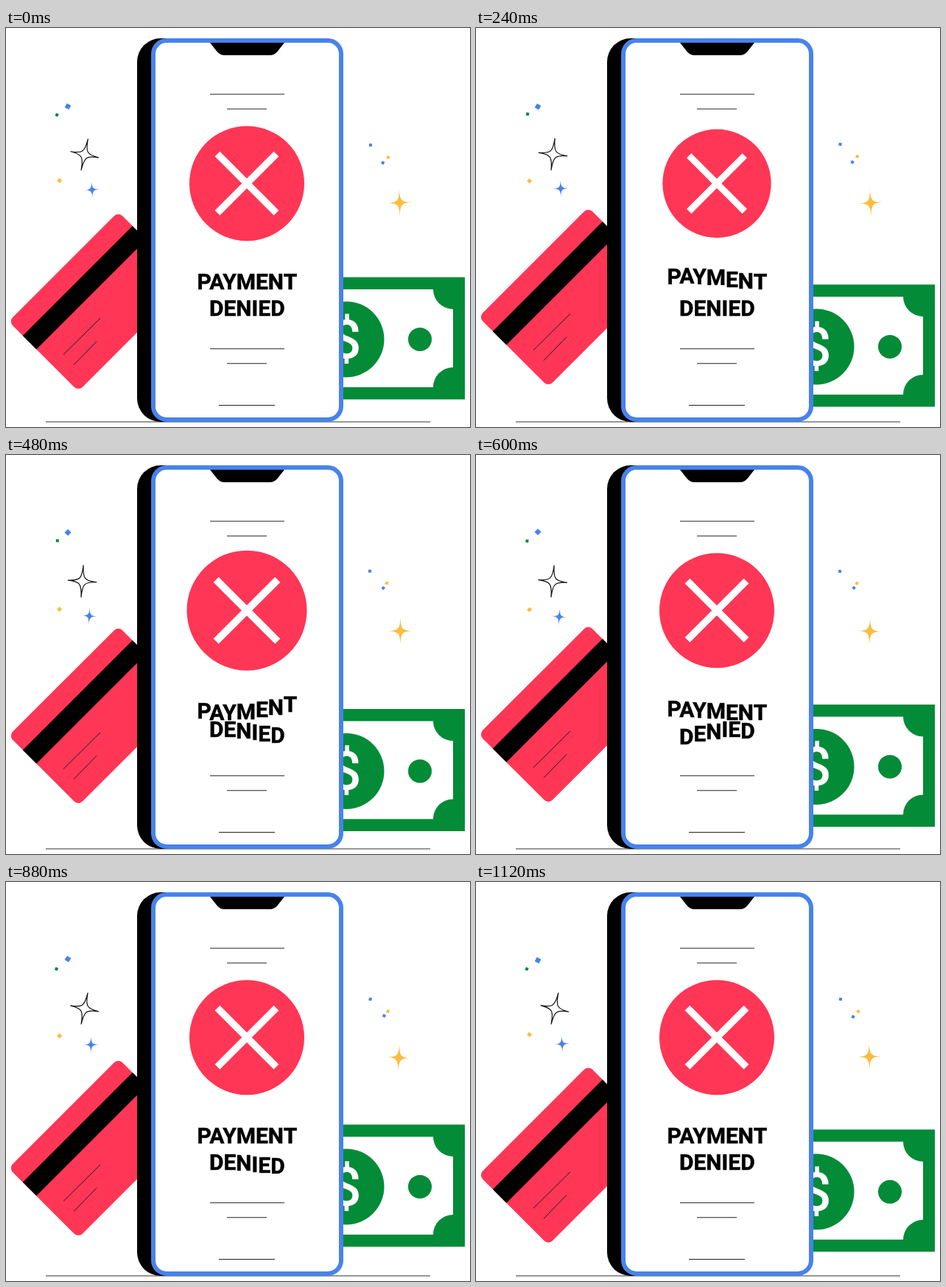
An HTML page with a canvas for the animation above (1160 ms loop, 630 by 542 pixels).

```html
<!DOCTYPE html>
<html lang="en">
<head>
<meta charset="utf-8">
<title>Payment denied</title>
<style>
  html, body { margin: 0; width: 630px; height: 542px; overflow: hidden; background: #fff; }
  canvas { display: block; }
</style>
</head>
<body>
<canvas id="stage" width="630" height="542"></canvas>
<script>
const ctx = document.getElementById('stage').getContext('2d');
const LOOP = 1160, STEP = 40;
const RED = '#ff3655', GREEN = '#048b37', BLUE = '#4783eb', YELLOW = '#fcbc42';

// Periodic swing that peaks at the given time in ms.
const swing = (t, peak) => Math.cos((t - peak) / LOOP * 2 * Math.PI);
const smooth = p => p * p * (3 - 2 * p);

// Eased keys, 200 ms apart; holds the first and last value.
function keyed(t, keys) {
  const last = keys.length - 1;
  const p = Math.min(Math.max(t / 200, 0), last);
  const i = Math.min(Math.floor(p), last - 1);
  return keys[i] + (keys[i + 1] - keys[i]) * smooth(p - i);
}

function at(x, y, deg, draw) {
  ctx.save();
  ctx.translate(x, y);
  ctx.rotate(deg * Math.PI / 180);
  draw();
  ctx.restore();
}

function line(x1, y1, x2, y2, width = 1, color = '#222') {
  ctx.beginPath();
  ctx.moveTo(x1, y1);
  ctx.lineTo(x2, y2);
  ctx.lineWidth = width;
  ctx.strokeStyle = color;
  ctx.stroke();
}

function disc(x, y, r, color) {
  ctx.beginPath();
  ctx.arc(x, y, r, 0, 2 * Math.PI);
  ctx.fillStyle = color;
  ctx.fill();
}

function box(x, y, w, h, color, r = 0) {
  ctx.beginPath();
  ctx.roundRect(x, y, w, h, r);
  ctx.fillStyle = color;
  ctx.fill();
}

function square(x, y, size, deg, color) {
  at(x, y, deg, () => box(-size / 2, -size / 2, size, size, color));
}

// Four thin points around a small body.
function starPath(rx, ry) {
  const near = 0.03, far = 0.16;
  ctx.beginPath();
  ctx.moveTo(0, -ry);
  for (const [sx, sy, vertical] of [[1, -1, true], [1, 1, false], [-1, 1, true], [-1, -1, false]]) {
    const x = sx * rx, y = sy * ry;
    if (vertical) ctx.bezierCurveTo(x * near, y * far, x * far, y * near, x, 0);
    else ctx.bezierCurveTo(x * far, y * near, x * near, y * far, 0, y);
  }
  ctx.closePath();
}

function star(x, y, rx, ry, deg, color) {
  at(x, y, deg, () => {
    starPath(rx, ry);
    ctx.fillStyle = color;
    ctx.fill();
  });
}

function sparkles(t) {
  const s = peak => swing(t, peak);
  square(84, 105.6 + 1.4 * s(150), 6.4, 35 + 8 * s(560), BLUE);
  square(69.3 + 0.8 * s(330), 117.4 - s(430), 4, 15 - 10 * s(430), GREEN);
  square(72.6, 208.6 - 1.5 * s(60), 5, 42 + 6 * s(600), YELLOW);
  star(114.9 + 1.9 * s(1120), 219.5 - 1.5 * s(300), 10.5, 12, -5 * s(0), BLUE);

  // The outlined star rocks on its lower tip.
  at(102, 193.2, 8.7 - 4.8 * s(450), () => {
    ctx.translate(0, -21.8);
    starPath(19.3, 21.6);
    ctx.lineWidth = 1.2;
    ctx.lineJoin = 'round';
    ctx.strokeStyle = '#111';
    ctx.stroke();
  });

  square(494.5 - 0.5 * s(520), 158.5 - 0.9 * s(400), 4, 8, BLUE);
  square(518 - s(480), 175 - s(440), 4, 20, YELLOW);
  square(512.3 - 1.3 * s(200), 181.8 - 1.3 * s(600), 4, 30 - 8 * s(0), BLUE);
  star(534.6 + 1.3 * s(320), 238.3 - 1.2 * s(60), 16, 19, -4 * s(200), YELLOW);
}

function card(t) {
  const dy = 9.6 * (swing(t, 20) - 1) - 0.3;
  at(3.5, 399 + dy, -45, () => {
    box(0, 0, 210.7, 134, RED, 8);
    box(0, 27.2, 210.7, 26.2, '#000');
  });
  line(78, 444 + dy, 128, 394.5 + dy);
  line(92, 458 + dy, 123, 426 + dy);
}

function note(t) {
  ctx.save();
  ctx.translate(0, 339.2 + 9.8 * swing(t, 305));
  box(301, 0, 322, 166, GREEN);
  box(317, 16.5, 290, 133, '#fff');
  ctx.save();
  ctx.beginPath();
  ctx.rect(317, 5, 300, 156);
  ctx.clip();
  disc(607, 16.5, 27, GREEN);
  disc(607, 149.5, 27, GREEN);
  ctx.restore();
  disc(462, 84.5, 51.5, GREEN);
  disc(562, 84.5, 16, GREEN);
  ctx.font = '500 71.5px Roboto, sans-serif';
  ctx.textAlign = 'center';
  ctx.fillStyle = '#fff';
  ctx.fillText('$', 462, 110.2);
  ctx.restore();
}

function phone() {
  box(178, 14, 240, 521, '#000', 32);
  ctx.beginPath();
  ctx.roundRect(200, 17, 255, 515, 18);
  ctx.fillStyle = '#fff';
  ctx.fill();
  ctx.lineWidth = 6;
  ctx.strokeStyle = BLUE;
  ctx.stroke();

  ctx.beginPath();
  ctx.moveTo(277, 20);
  ctx.lineTo(286.5, 32);
  ctx.quadraticCurveTo(290.5, 37, 297, 37);
  ctx.lineTo(358, 37);
  ctx.quadraticCurveTo(364.5, 37, 368.5, 32);
  ctx.lineTo(378, 20);
  ctx.fillStyle = '#000';
  ctx.fill();

  for (const y of [90, 435.75]) {
    line(277, y, 378, y);
    line(300, y + 20, 354, y + 20);
  }
  line(289, 512.5, 365, 512.5);
}

function badge(t) {
  ctx.save();
  ctx.translate(327, 211.2);
  const k = keyed(t, [1, 0.93, 1.07, 1]);
  ctx.scale(k, k);
  disc(0, 0, 78, RED);
  line(-40, -40, 40, 40, 9.5, '#fff');
  line(-40, 40, 40, -40, 9.5, '#fff');
  ctx.restore();
}

// Letters hop one after another, each 38 ms later than the one before.
function hopText(text, y, first, t) {
  ctx.font = '700 30px Roboto, sans-serif';
  ctx.textAlign = 'left';
  ctx.fillStyle = ctx.strokeStyle = '#000';
  ctx.lineWidth = 0.5;
  const width = s => ctx.measureText(s).width;
  const left = 327.3 - width(text) / 2;
  [...text].forEach((ch, i) => {
    const x = left + width(text.slice(0, i + 1)) - width(ch);
    const hop = keyed(t - (first + i) * 38, [0, -8, 5.3, 0]);
    ctx.fillText(ch, x, y + hop);
    ctx.strokeText(ch, x, y + hop);
  });
}

function draw(t) {
  ctx.fillStyle = '#fff';
  ctx.fillRect(0, 0, 630, 542);
  line(54, 535, 576, 535, 1.2, '#333');
  sparkles(t);
  card(t);
  note(t);
  phone();
  badge(t);
  hopText('PAYMENT', 355, 0, t);
  hopText('DENIED', 391, 7, t);
}

const start = performance.now();
function frame() {
  const t = (performance.now() - start) % LOOP;
  draw(Math.floor(t / STEP) * STEP);
  requestAnimationFrame(frame);
}
frame();
</script>
</body>
</html>
```
